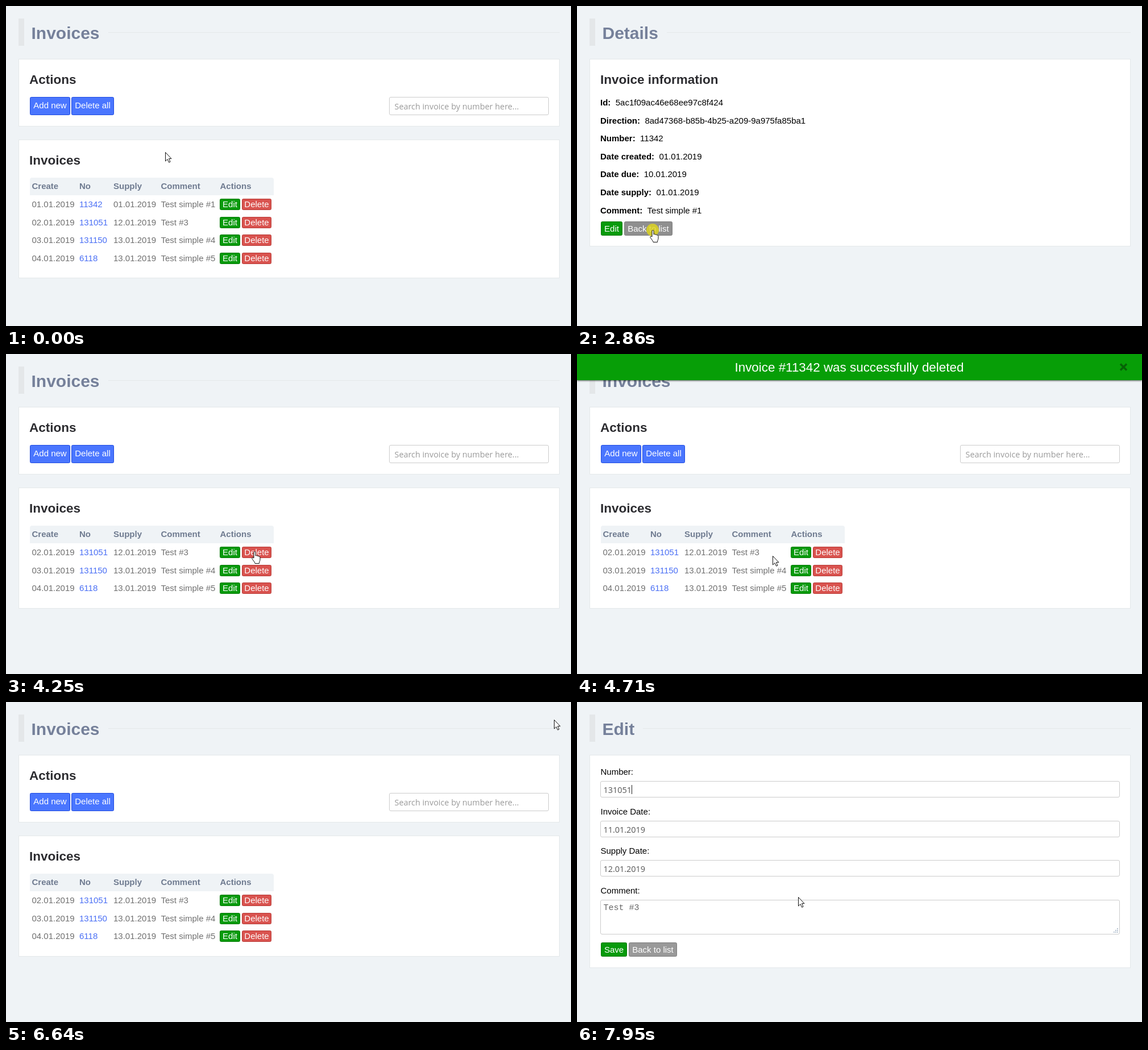
An HTML page for the animation above (8 s loop, 994 by 563 pixels).

```html
<!DOCTYPE html>
<html lang="en">
<head>
<meta charset="utf-8">
<title>Invoices</title>
<style>
  html, body { margin: 0; width: 100%; height: 100%; overflow: hidden; background: #eff3f6; }
  svg { display: block; font: 15px "Liberation Sans", Arial, sans-serif; cursor: default; }
  .title { font-size: 30px; font-weight: bold; fill: #75809a; }
  .heading { font-size: 22.5px; font-weight: bold; fill: #2c2c30; }
  .bold { font-weight: bold; }
  .head { font-weight: bold; fill: #6f7b90; }
  .cell { fill: #707070; }
  .link { fill: #4a6ff5; }
  .link.hover { fill: #2347c8; }
  .light { fill: #fff; }
  .field { font: 14.4px "Open Sans", "Noto Sans", sans-serif; fill: #555; }
  .hint { fill: #9a9a9a; }
  .mono { font: 15px "Liberation Mono", monospace; fill: #666; }
  .banner { font-size: 22.4px; fill: #fff; }
</style>
</head>
<body>
<svg width="994" height="563" viewBox="0 0 994 563">
  <g id="list4"></g>
  <g id="list3"></g>
  <g id="details"></g>
  <g id="edit"></g>
  <g id="banner">
    <rect width="994" height="46" fill="#079e07" style="filter:drop-shadow(0 1px 1.5px rgba(0,0,0,.65))"/>
    <text class="banner" x="277.5" y="31">Invoice #11342 was successfully deleted</text>
    <path id="close" d="M956 17.5l11 11m0-11l-11 11" stroke-width="3.4"/>
  </g>
  <circle id="click" r="11" fill="#e1d719" fill-opacity=".8"/>
  <g id="cursor" fill="#fff" stroke="#111" stroke-linejoin="round">
    <path id="arrow" d="M.5.5V16L4 12.6 6.6 18.2 9 17.1 6.5 11.6H11Z"/>
    <path id="hand" d="M-1 12V2a1.5 1.5 0 0 1 3 0V8c.5-1 2.5-.8 2.8 .5 .6-.8 2.4-.5 2.8 .8
      .8-.6 2.4-.1 2.4 1.6V15c0 2-1.6 3.4-1.6 6.5H1c0-2.4-2.6-4.2-5-8.2-1-1.7 .9-2.9 2-1.8Z"/>
  </g>
</svg>
<script>
const $ = id => document.getElementById(id);

const colors = {
  blue: ['#4a76ff', '#1f4be0'],
  green: ['#079a0b', '#067a06'],
  red: ['#d9534f', '#b93a36'],
  gray: ['#999', '#7c7c7c']
};

const text = (x, y, label, cls = '') => `<text class="${cls}" x="${x}" y="${y}">${label}</text>`;

const box = (x, y, w, h, stroke, fill = '#fff', r = 0) =>
  `<rect x="${x + .5}" y="${y + .5}" width="${w - 1}" height="${h - 1}" rx="${r}" fill="${fill}" stroke="${stroke}"/>`;

const card = (top, bottom) => box(22, top, 952, bottom - top, '#e4e8ea');

const button = (x, y, w, h, label, color, baseline) =>
  `<g class="button">${box(x, y, w, h, colors[color][1], colors[color][0], 2)}
   <text class="light" text-anchor="middle" x="${x + w / 2}" y="${y + baseline}">${label}</text></g>`;

const input = (y, h) => box(41, y, 914, h, '#ccc', '#fff', 2.5);

const header = (title, lineStart) =>
  `<path d="M22 22h10v48h-10z" fill="#e4e7e9"/>
   <path d="M${lineStart} 46.5H974" stroke="#e4e8ea"/>` + text(44.5, 58, title, 'title');

const rowOffset = i => Math.round(i * 31.6);

const invoices = [
  ['01.01.2019', '11342', '01.01.2019', 'Test simple #1'],
  ['02.01.2019', '131051', '12.01.2019', 'Test #3'],
  ['03.01.2019', '131150', '13.01.2019', 'Test simple #4'],
  ['04.01.2019', '6118', '13.01.2019', 'Test simple #5']
];
const columns = [45.5, 129, 189, 272.5, 376.5];

function listPage(rows) {
  const heads = ['Create', 'No', 'Supply', 'Comment', 'Actions'];
  return header('Invoices', 180) +
    card(93, 212) + text(41, 137, 'Actions', 'heading') +
    button(42, 160, 71, 32, 'Add new', 'blue', 20) +
    button(115, 160, 75, 32, 'Delete all', 'blue', 20) +
    box(674, 160, 281, 32, '#ccc', '#fff', 2.5) +
    text(683.5, 182, 'Search invoice by number here...', 'field hint') +
    card(235, 353 + rowOffset(rows.length)) + text(41, 279, 'Invoices', 'heading') +
    '<path d="M42 333V306q0-4 4-4H467q4 0 4 4V333z" fill="#eff3f6"/>' +
    heads.map((label, c) => text(columns[c], 322, label, 'head')).join('') +
    rows.map((row, i) => {
      const y = rowOffset(i);
      return row.map((label, c) => text(columns[c], 354 + y, label, c === 1 ? 'link' : 'cell')).join('') +
        button(376, 339 + y, 36, 20, 'Edit', 'green', 15) +
        button(415, 339 + y, 52, 20, 'Delete', 'red', 15);
    }).join('');
}

function detailsPage() {
  const facts = [
    ['Id', '5ac1f09ac46e68ee97c8f424'],
    ['Direction', '8ad47368-b85b-4b25-a209-9a975fa85ba1'],
    ['Number', '11342'],
    ['Date created', '01.01.2019'],
    ['Date due', '10.01.2019'],
    ['Date supply', '01.01.2019'],
    ['Comment', 'Test simple #1']
  ];
  return header('Details', 158) + card(93, 423) +
    text(41, 137, 'Invoice information', 'heading') +
    facts.map(([name, value], i) =>
      text(41, 175 + rowOffset(i), `<tspan class="bold">${name}:</tspan><tspan dx="8.4">${value}</tspan>`)).join('') +
    button(42, 379, 38, 25, 'Edit', 'green', 18) +
    button(83, 379, 85, 25, 'Back to list', 'gray', 18);
}

function editPage() {
  const fields = [['Number', '131051'], ['Invoice Date', '11.01.2019'], ['Supply Date', '12.01.2019']];
  const grip = [[0, 0], [-3, 0], [-6, 0], [0, -3], [-3, -3], [0, -6]];
  return header('Edit', 116) + card(93, 468) +
    fields.map(([name, value], i) => {
      const y = Math.round(i * 69.7);
      return text(41.5, 128 + y, name + ':') + input(139 + y, 29) + text(46.5, 160 + y, value, 'field');
    }).join('') +
    '<path id="caret" d="M96.5 146v16" stroke="#222"/>' +
    text(41.5, 337, 'Comment:') + input(348, 61) + text(46.5, 366, 'Test #3', 'mono') +
    grip.map(([x, y]) => `<rect x="${950 + x}" y="${404 + y}" width="1.6" height="1.6" fill="#8fa3b8"/>`).join('') +
    button(42, 423, 46, 25, 'Save', 'green', 18) +
    button(91, 423, 85, 25, 'Back to list', 'gray', 18);
}

$('list4').innerHTML = listPage(invoices);
$('list3').innerHTML = listPage(invoices.slice(1));
$('details').innerHTML = detailsPage();
$('edit').innerHTML = editPage();
const firstLink = document.querySelector('#list4 .link');
const backButton = document.querySelectorAll('#details .button rect')[1];

const LOOP = 8000;
const pages = [[0, 'list4'], [1230, 'details'], [2930, 'list4'], [4250, 'list3'], [7640, 'edit']];
const clicks = [[1080, 1230], [2780, 2930], [4170, 4250], [6490, 6640], [7490, 7640]];
const handTimes = [[690, 1310], [2480, 2930], [3940, 4560], [5950, 6180], [6260, 6640], [7330, 7950]];

// Cursor moves: first and last change, number of steps, end point, easing powers
const moves = [
  [160, 770, 9, 158, 352],
  [2170, 2550, 6, 133, 394],
  [3330, 4020, 10, 437, 347],
  [4480, 4860, 6, 327, 356],
  [5260, 6030, 11, 964, 31, 1.854, 1.56],
  [6720, 7410, 10, 394, 347],
  [7490, 7490, 1, 394, 343],
  [7950, 7950, 1, 389, 343]
];

const within = (t, spans) => spans.some(([from, to]) => t >= from && t < to);
const show = (node, on) => node.style.display = on ? '' : 'none';
const easeOut = (p, power) => 1 - (1 - p) ** power;

function cursorAt(t) {
  let x = 280, y = 257;
  for (const [from, to, steps, endX, endY, powerX = 1.7, powerY = 1.7] of moves) {
    if (t < from) break;
    const step = to > from ? Math.floor((t - from) / (to - from) * (steps - 1) + .1) + 1 : steps;
    const p = Math.min(1, step / steps);
    x += (endX - x) * easeOut(p, powerX);
    y += (endY - y) * easeOut(p, powerY);
  }
  return [Math.round(x), Math.round(y)];
}

function render(t) {
  const page = pages.filter(([from]) => t >= from).pop()[1];
  for (const id of ['list4', 'list3', 'details', 'edit']) show($(id), id === page);
  show($('caret'), t >= 7720);
  show($('banner'), t >= 4480 && t < 6640);
  $('close').setAttribute('stroke', t >= 5950 ? '#043c04' : '#066206');
  firstLink.classList.toggle('hover', t >= 690 && t < 1230);
  backButton.setAttribute('fill', t >= 2860 ? '#8f8f8f' : colors.gray[0]);

  const place = `translate(${cursorAt(t)})`;
  const hand = within(t, handTimes);
  $('cursor').setAttribute('transform', place);
  $('click').setAttribute('transform', place);
  show($('click'), within(t, clicks));
  show($('hand'), hand);
  show($('arrow'), !hand);
}

const start = performance.now();
function frame() {
  render((performance.now() - start) % LOOP);
  requestAnimationFrame(frame);
}
frame();
</script>
</body>
</html>
```
